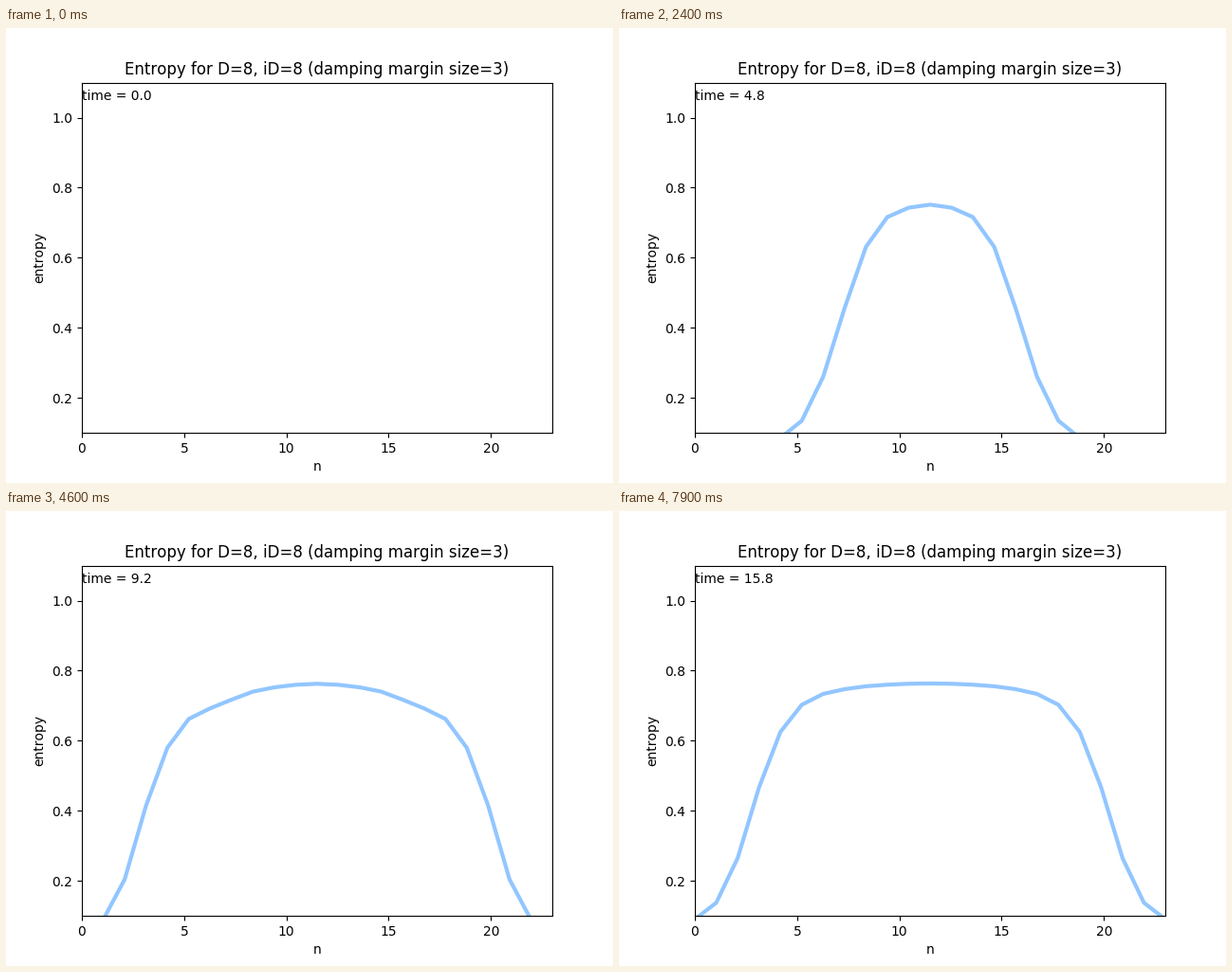
Recreate the animation shown at these times as a matplotlib script. Size 640 px wide and 480 px high, loop 8000 ms.

```python
import numpy as np
import matplotlib.pyplot as plt
from matplotlib.animation import FuncAnimation

FRAMES, INTERVAL, DT = 80, 100, 0.2
BONDS, MID = 23, 11
BASE = 0.071  # entropy of the undisturbed chain

K = np.arange(-45, 46)
THETA = np.arange(128) * 2 * np.pi / 128
OFFSET = np.arange(BONDS) - MID
EDGE = MID - np.abs(OFFSET)  # bonds between each bond and the nearest end


def spread(t):
    """Probability of the excitation at each offset: Bessel J_k(t) squared."""
    return np.cos(K[:, None] * THETA - t * np.sin(THETA)).mean(axis=1) ** 2


def light_cone(t):
    """Two-level entropy of a freely spreading excitation."""
    prob = spread(t)
    left = np.cumsum(prob) - prob
    right = np.clip(1 - left - prob, 0, 1)
    q = left * right + prob * (1 - prob) / 2
    lam = 0.5 - np.sqrt(0.25 - np.clip(q, 1e-12, 0.25))
    s = -lam * np.log(lam) - (1 - lam) * np.log(1 - lam)
    s = np.convolve(s, [0.2, 0.6, 0.2], mode="same")
    return s[OFFSET + len(K) // 2]


def margin(t):
    """Damping towards both ends, reaching further in at late times."""
    depth = 1.75 + 0.39 * max(0, t - 13.6)
    return 1 / (1 + np.exp((depth - EDGE) / (0.3 * depth)))


def entropy(t):
    growth = 1 - np.exp(-t)
    return BASE + growth * light_cone(t) * margin(t)


plt.rcParams["text.kerning_factor"] = 6
fig, ax = plt.subplots(figsize=(6.4, 4.8), dpi=100)
ax.set(xlim=(0, 23), ylim=(0.1, 1.1), xlabel="n", ylabel="entropy",
       title="Entropy for D=8, iD=8 (damping margin size=3)")
bonds = np.linspace(0, 23, BONDS)
line, = ax.plot([], [], color="#92C6FF", lw=3)
label = ax.text(0, 1.05, "")


def update(i):
    t = i * DT
    line.set_data(bonds, entropy(t))
    label.set_text(f"time = {t:.1f}")
    return line, label


anim = FuncAnimation(fig, update, frames=FRAMES, interval=INTERVAL,
                     repeat=True, repeat_delay=0)
plt.show()
```
